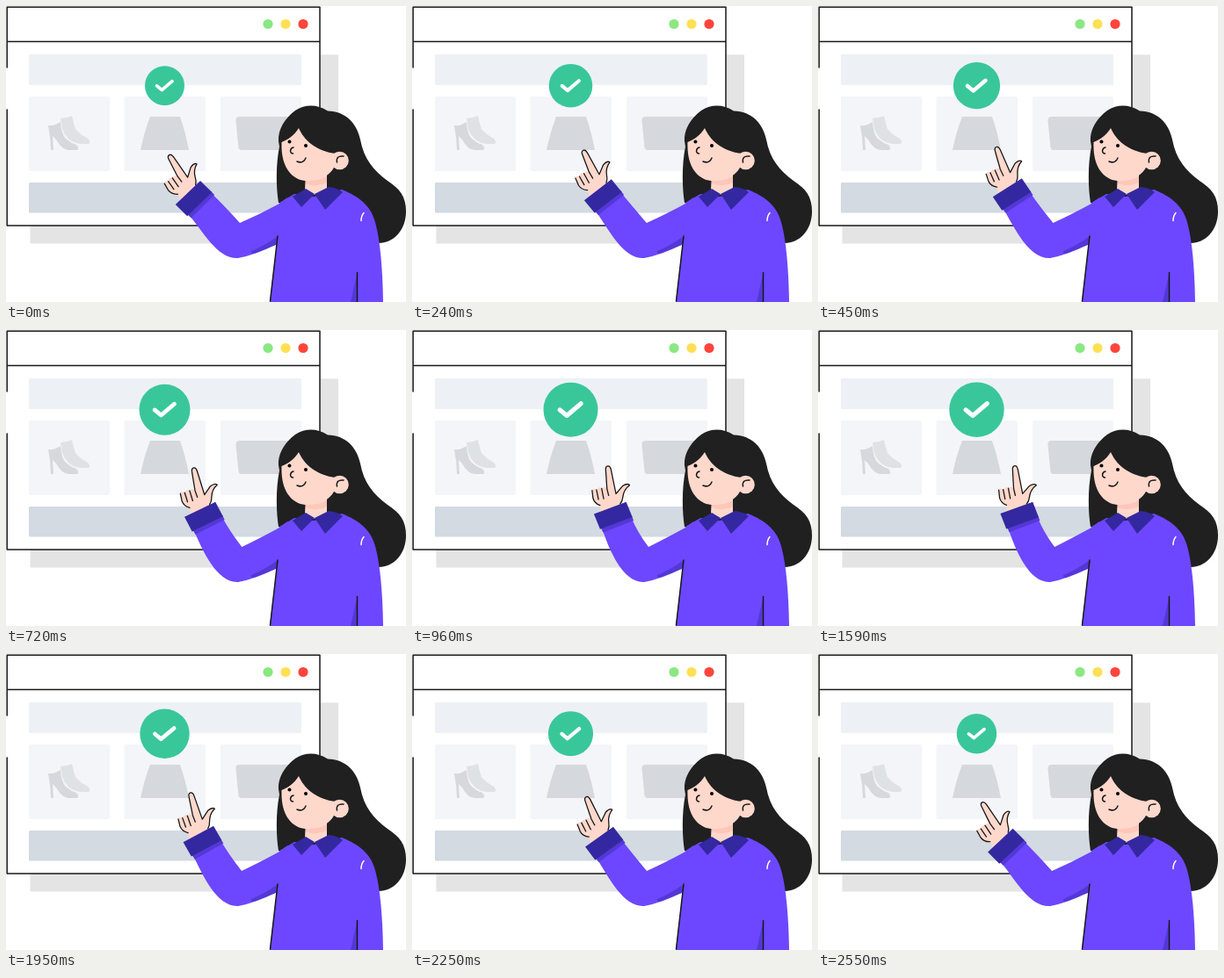
These frames come from a looping animation (455 by 337 pixels, 2.58 s). An HTML page:

```html
<!DOCTYPE html>
<html lang="en">
<head>
<meta charset="utf-8">
<title>Choosing an item</title>
<style>
  html, body { margin: 0; width: 100%; height: 100%; overflow: hidden; background: #fff; }
  svg { display: block; width: 100vw; height: 100vh; }
  .line { fill: none; stroke: #181818; stroke-width: 1.5; stroke-linecap: round; stroke-linejoin: round; }
  .skin { fill: #ffd8cc; }
  .hair { fill: #202020; }
  .sweater { fill: #6c47ff; }
  .shade { fill: #5438d4; }
  .trim { fill: #3428a0; }
  .card { fill: #f4f5f9; }
  .item { fill: #d5d8dc; }
</style>
</head>
<body>
<svg viewBox="0 0 455 337">
  <!-- browser window -->
  <path fill="#e4e4e4" d="M27.500 55.500H378V270.500H27.500z"/>
  <path fill="#fff" d="M0 1H357V250H0z"/>
  <path class="line" d="M1.200 70V1.200H357V250H1.200V118M1.200 40.500H357"/>
  <circle cx="298" cy="20.500" r="5.600" fill="#8be782"/>
  <circle cx="318" cy="20.500" r="5.600" fill="#ffe055"/>
  <circle cx="338" cy="20.500" r="5.600" fill="#ff453c"/>
  <rect x="26" y="55" width="310" height="35" rx="1.500" fill="#edf1f6"/>
  <rect class="card" x="26" y="103" width="92" height="85" rx="2"/>
  <rect class="card" x="134.500" y="103" width="92.500" height="85" rx="2"/>
  <rect class="card" x="244" y="103" width="92" height="85" rx="2"/>
  <rect x="26" y="201" width="310" height="34.500" rx="1.500" fill="#d3dae1"/>

  <!-- goods -->
  <path fill="#dfe2e4" d="M62 128Q68 128 75 125Q77 134 79 140Q84 146 93 151Q97 155 94 157H85Q76 156 71 151Q66 146 64 140Z"/>
  <path class="item" d="M48 136Q55 137 62 132Q63 145 67 150Q72 155 80 158Q84 162 81 164H71Q63 163 57 152L53 148L54 164H51Q51 150 48 136Z"/>
  <path class="item" d="M164 126H198Q204 143 208 164H153Q157 144 164 126Z"/>
  <path class="item" d="M266 126H325V164H268Q265 164 264.500 161L261.500 131Q261 126 266 126Z"/>

  <g id="badge">
    <circle r="22.500" fill="#39c79a"/>
    <path d="M-8.900 .200L-3.200 4.900L8.500 -5" fill="none" stroke="#fff" stroke-width="3.700" stroke-linecap="round" stroke-linejoin="round"/>
  </g>

  <!-- head -->
  <path class="hair" d="M310 154C309 140 318 127 329 119Q347 108 366 119.500C386 120 399 133 403 152C407 174 418 187 434 199C448 208 455 217 455 234C455 256 440 270 424 270L380 235L310 224C307 205 307 180 311 160Z"/>
  <path class="skin" d="M341 190H365V208L351 215L340 209Z"/>
  <path fill="#ffc6ba" d="M341 198Q354 200 365 194V201Q354 207 341 202Z"/>
  <path class="skin" d="M333 139C327 148 321 152 313.500 155C313 170 316 182 323 190C329 197 338 200 346 199C358 198 368 193 373 184L376 168C352 166 338 151 333 139Z"/>
  <circle class="skin" cx="379.500" cy="176" r="10.300"/>
  <path class="line" d="M376.500 178Q375 170 384 171M327 161C322.500 162 322.500 168 326.500 168M331 177Q338 180 341 173"/>
  <circle cx="322.500" cy="154.500" r="2"/>
  <circle cx="341" cy="159" r="2"/>

  <!-- body -->
  <path class="sweater" d="M300 337L309 262L311 224L328 214L350 217L382 209C402 217 416 228 420.500 248Q428 277 429 337Z"/>
  <path class="trim" d="M326 217L341 208L351 214L336 229ZM351 214L367 206Q377 207 383 212L363 232Z"/>
  <path id="sleeve" class="sweater"/>
  <path class="shade" d="M309 262Q294 273 279 279Q278 283 283 281.500L307 272ZM399.500 304L392 337H399.500Z"/>
  <path class="line" d="M309 262L300.500 336M399.500 303.500V337"/>
  <path class="line" style="stroke:#fff" d="M404 244.500Q404 239 407 235.500"/>

  <!-- hand, drawn upright -->
  <g id="hand">
    <path class="skin" d="M219 206L220 198Q214 194 213 188L213 179Q215 176 218 179Q221 175 224 178Q227 175 230 179L231 158Q231 153.500 234 153.500Q236.500 153.500 237 158L239.500 186L248 178Q254 175 256 178Q249 182 247 190Q246 195 243 198L244 202Z"/>
    <path class="line" style="stroke-width:1.3" d="M220 197Q214 194 213 188V179M219 190L218 179M225 190L224 178M231 187L230 179L231 158Q231 153.500 234 153.500Q236.500 153.500 237 158L239.500 186L248 178Q254 175 256 178Q249 182 247 190Q246 195 243 198"/>
    <path class="shade" d="M218 222L254.500 213L256 218.500L220 228Z"/>
    <path class="trim" d="M212 206L250 196.500L255 214.500L217 224Z"/>
  </g>
</svg>
<script>
  const LOOP = 2580, LOW = -29.9, SWING = 30.6, ELBOW = [240, 252];
  const badge = document.getElementById('badge');
  const hand = document.getElementById('hand');
  const sleeve = document.getElementById('sleeve');

  function turn(x, y, degrees) {
    const a = degrees * Math.PI / 180, dx = x - ELBOW[0], dy = y - ELBOW[1];
    return [ELBOW[0] + dx * Math.cos(a) - dy * Math.sin(a),
            ELBOW[1] + dx * Math.sin(a) + dy * Math.cos(a)];
  }

  function draw() {
    const phase = performance.now() % LOOP / LOOP;
    const linear = 1 - Math.abs(1 - 2 * phase);
    const raised = linear * (1.1 - 0.1 * linear);
    const angle = LOW + SWING * raised;
    const at = (x, y) => turn(x, y, angle);

    badge.setAttribute('transform', `translate(180.5 90.7) scale(${1 + 0.495 * raised})`);
    hand.setAttribute('transform', `rotate(${angle} ${ELBOW})`);
    sleeve.setAttribute('d',
      `M${at(219, 222)}C${at(224.5, 249)} 240 288 264 287Q285 283 308 271L320 218L311 225` +
      `Q288 237.5 ${266 + 4 * raised} 247Q${at(259, 233)} ${at(253.5, 214)}Z`);
    requestAnimationFrame(draw);
  }
  draw();
</script>
</body>
</html>
```
